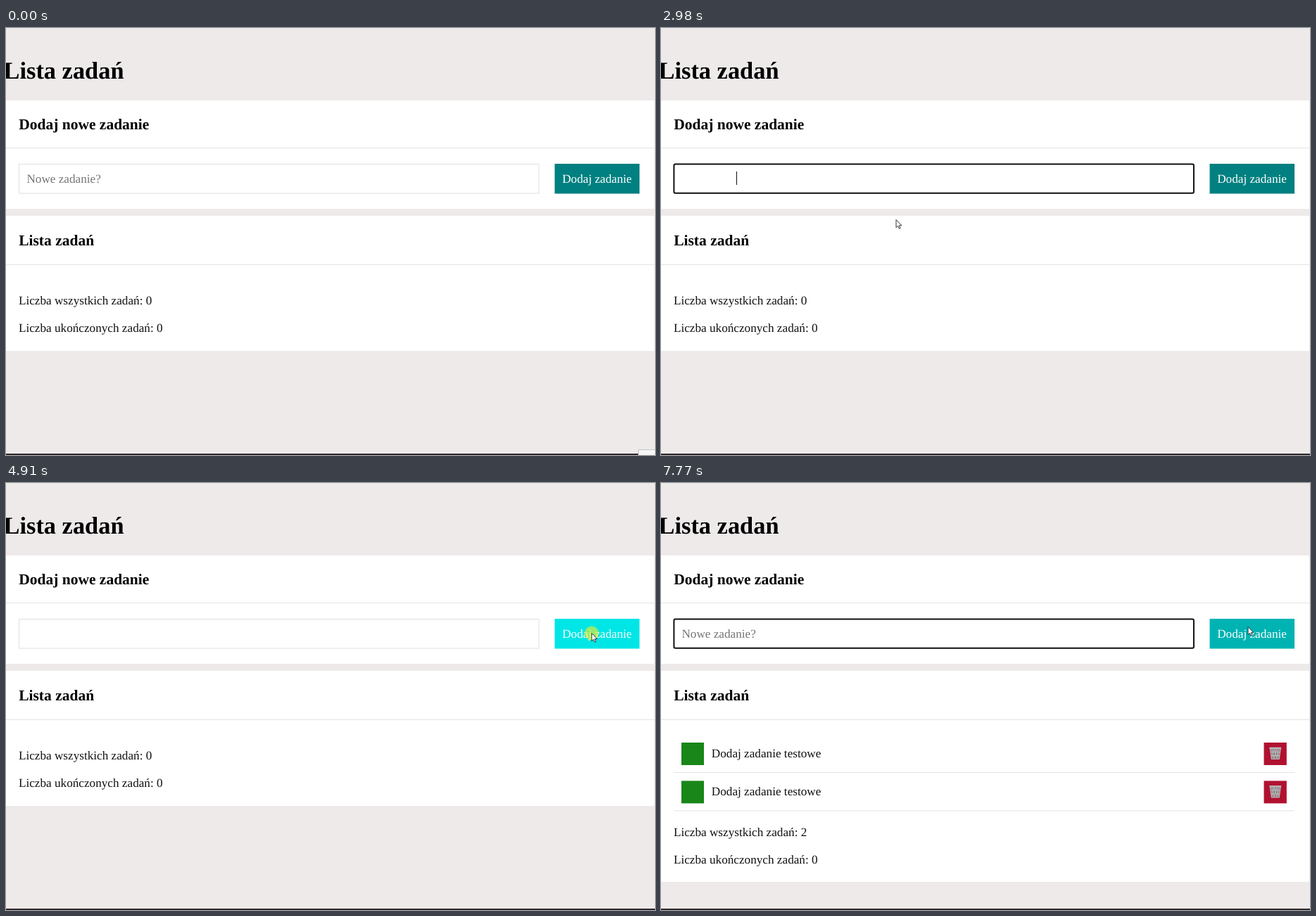
Write an HTML page that moves like this. It is 922 px wide and 607 px high and loops after 8 s.

```html
<!DOCTYPE html>
<html lang="pl">
<head>
<meta charset="utf-8">
<title>Lista zadań</title>
<style>
html, body { margin: 0; width: 100%; height: 100%; overflow: hidden; background: #eeeaea; }
svg { display: block; width: 922px; height: 607px; }
text { font: 17.2px "Liberation Serif", "Times New Roman", serif; text-rendering: geometricPrecision; white-space: pre; fill: #111; }
.h1 { font-size: 34.4px; font-weight: bold; fill: #000; }
.h2 { font-size: 21.5px; font-weight: bold; fill: #000; }
.hint { fill: #757575; }
.light { fill: #fff; }
.rule { fill: #e3e3e3; }
</style>
</head>
<body>
<svg viewBox="0 0 922 607" xmlns="http://www.w3.org/2000/svg">
  <defs>
    <g id="bin" fill="none" stroke="#b9b9b9">
      <path d="M-7.5-7.6H7.5L5.4 8H-5.4Z" fill="#8d7a80" stroke-width="1.2"/>
      <path d="M-8.3-7.6H8.3" stroke-width="2.4"/>
      <path d="M-5-6L-2 7M-1.5-6L2 7M2-6L4.5 5M5-6L2 7M1.5-6L-2 7M-2-6L-4.5 5M-6.5-2H6.5M-6 3H6"/>
    </g>
    <g id="task">
      <rect x="29" y="369" width="32" height="32" fill="#188618"/>
      <text x="71.8" y="390">Dodaj zadanie testowe</text>
      <rect x="856.5" y="369" width="32.3" height="32" fill="#b11131"/>
      <use href="#bin" x="872.8" y="384.5"/>
      <rect class="rule" x="18" y="411" width="882" height="1"/>
    </g>
  </defs>
  <rect width="922" height="607" fill="#eeeaea"/>
  <text class="h1" x="-3.5" y="72">Lista zadań</text>

  <rect y="103" width="921" height="154" fill="#fff"/>
  <rect class="rule" y="170" width="921" height="1"/>
  <text class="h2" x="18.2" y="144">Dodaj nowe zadanie</text>
  <rect id="plain" x="18.5" y="193.5" width="738.5" height="41.5" fill="#fff" stroke="#e0e0e0"/>
  <rect id="focus" x="18.4" y="193.4" width="738.5" height="41.4" rx="2" fill="#fff" stroke="#101010" stroke-width="2"/>
  <text id="hint" class="hint" x="29.4" y="220">Nowe zadanie?</text>
  <text id="value" y="220">Dodaj zadanie testowe</text>
  <rect id="caret" width="1" height="19" fill="#111"/>
  <rect id="button" x="779.5" y="193" width="120.5" height="42.5"/>
  <text class="light" x="790.2" y="220">Dodaj zadanie</text>

  <rect id="panel" y="267" width="921" fill="#fff"/>
  <rect class="rule" y="336" width="921" height="1"/>
  <text class="h2" x="18.2" y="309">Lista zadań</text>
  <use id="task1" href="#task"/>
  <use id="task2" href="#task" y="54.4"/>
  <g id="counts">
    <text id="total" x="17.9" y="393"></text>
    <text x="17.9" y="432">Liczba ukończonych zadań: 0</text>
  </g>

  <rect y="605" width="922" height="2" fill="#302a2c"/>
  <rect id="tip" x="898.5" y="599.5" width="30" height="12" fill="#f6f6f6" stroke="#c4c4c4"/>
  <circle id="ring" r="10" fill="#f6ee22"/>
  <path id="arrow" d="M0 0V11.2L2.6 8.8L4.3 12.8L6.1 12L4.4 8.2H7.9Z" fill="#fff" stroke="#222" stroke-width=".9"/>
  <path id="beam" d="M-3-7.5H-.8L0-7L.8-7.5H3M0-7V7M-3 7.5H-.8L0 7L.8 7.5H3" fill="none" stroke="#222"/>
</svg>
<script>
const LOOP = 8000, SPACE = 4.3, TEXT_X = 29.4, TEXT_W = 155.7, ROW = 54.4, BLINK = 530;
const el = id => document.getElementById(id);
const set = (id, attrs) => { for (const k in attrs) el(id).setAttribute(k, attrs[k]); };
const show = (id, on) => { el(id).style.display = on ? '' : 'none'; };
const clamp = (v, lo, hi) => Math.min(hi, Math.max(lo, v));
const within = (t, a, b) => t >= a && t < b;

// pointer stops: time, x, y
const path = [
  [360, 860, 604], [900, 431, 220], [1140, 431, 220], [1780, 167.5, 284], [1980, 167.5, 284],
  [2270, 195, 282], [2410, 195, 282], [2640, 240, 328], [2980, 334, 272.5], [3190, 540, 216],
  [3230, 540, 216], [3790, 834, 213.5], [4460, 834, 213.5], [4770, 832, 213.5],
  [5010, 832, 213.5], [5210, 834, 204.5]
];
// mouse button: down, up
const clicks = [[1100, 1220], [4020, 4190], [4460, 4620], [4840, 5010]];
const FADE = 180;

function pointer(t) {
  const i = path.findIndex(p => p[0] > t);
  if (i < 0) return path[path.length - 1].slice(1);
  if (i === 0) return path[0].slice(1);
  const [t0, x0, y0] = path[i - 1], [t1, x1, y1] = path[i];
  const u = (t - t0) / (t1 - t0), e = u * u * (3 - 2 * u);
  return [x0 + (x1 - x0) * e, y0 + (y1 - y0) * e];
}

function spaces(t) {
  if (t < 1980 || t >= 6700) return t >= 7230 && t < 7630 ? 16 : 0;
  if (t >= 5790) return 57;
  return clamp(18 + Math.floor((t - 2980) / 33.4), 1, 41);
}

function caretOn(t) {
  if (t < 1100) return false;
  if (t >= 2410 && t < 3790) return true;
  const start = [1100, 1980, 3790, 4190, 4620, 5010, 5790, 6830, 7230].filter(s => s <= t).pop();
  const period = start === 5790 || start === 7230 ? 540 : BLINK;
  return t < 6700 || t >= 6830 ? Math.floor((t - start) / period) % 2 === 0 : false;
}

function draw(t) {
  const [x, y] = pointer(t);
  const held = clicks.some(([a, b]) => within(t, a, b));
  const active = held && t > 2000;
  const focused = t >= 1100 && !active;
  const overButton = x >= 779.5 && x <= 900 && y >= 193 && y <= 235.5;
  const overInput = x >= 18 && x <= 757 && y >= 193 && y <= 235.5;

  const n = spaces(t), pasted = within(t, 5790, 6700) || within(t, 7230, 7630);
  const valueX = TEXT_X + n * SPACE;
  show('plain', !focused);
  show('focus', focused);
  show('hint', n === 0);
  show('value', pasted);
  set('value', { x: valueX });
  show('caret', focused && caretOn(t));
  set('caret', { x: Math.round(valueX + (pasted ? TEXT_W : 0)), y: n ? 204 : 205 });
  set('button', { fill: active ? '#00e6e6' : overButton ? '#00b3b3' : '#008080' });

  const tasks = (t >= 6700) + (t >= 7630);
  show('task1', tasks > 0);
  show('task2', tasks > 1);
  set('panel', { height: Math.round(191.6 + tasks * ROW) });
  set('counts', { transform: `translate(0 ${Math.round(tasks * ROW)})` });
  el('total').textContent = 'Liczba wszystkich zadań: ' + tasks;

  const click = clicks.find(([a, b]) => within(t, a, b + FADE));
  show('ring', click);
  if (click) set('ring', { cx: x, cy: y, opacity: 0.6 * clamp(1 - (t - click[1]) / FADE, 0, 1) });
  const at = { transform: `translate(${x} ${y})` };
  set('arrow', at);
  set('beam', at);
  show('arrow', t >= 360 && !overInput);
  show('beam', t >= 360 && overInput);
  show('tip', t < 160);
}

const began = performance.now();
function tick() {
  draw((performance.now() - began) % LOOP);
  requestAnimationFrame(tick);
}
tick();
</script>
</body>
</html>
```
